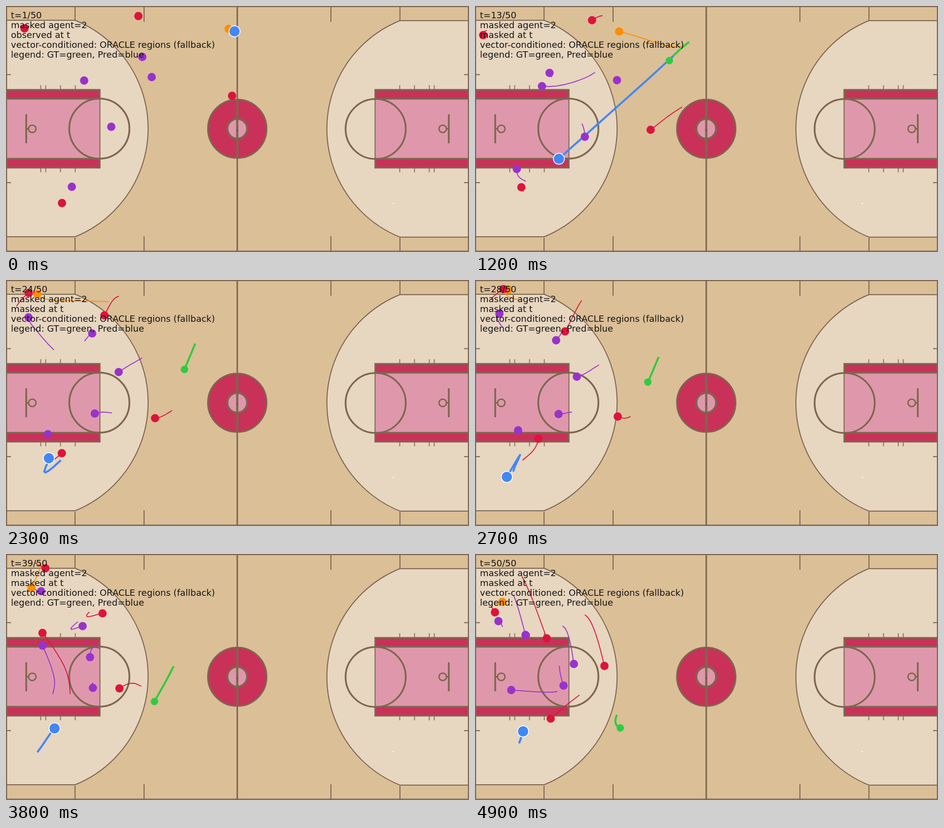
Write an HTML page with a canvas that moves like this. It is 939x500 px and loops after 5000 ms.

```html
<!DOCTYPE html>
<html lang="en">
<head>
<meta charset="utf-8">
<title>Masked agent trajectories</title>
<style>
html, body { margin: 0; width: 100%; height: 100%; overflow: hidden; background: #dbbf97; }
canvas { display: block; }
</style>
</head>
<body>
<canvas id="stage" width="939" height="500"></canvas>
<script>
const W = 939, H = 500, STEP = 100, STEPS = 50, TAIL = 8;
const RED = '#dc143c', PURPLE = '#9932cc', ORANGE = '#ff8c00', GREEN = '#2ecc40', BLUE = '#4287f5';
const FLOOR = '#dbbf97', LIGHT = '#e7d6c0', LINE = '#7d6650', CRIMSON = '#c93158', PINK = '#df98ab';

const ctx = document.getElementById('stage').getContext('2d');

// Steps at which a path passes its waypoints
const STOPS = [0, 6, 13, 19, 27, 33, 42, 49];
const PRED_STOPS = [0, 1, 3, 6, 11, 19, 22, 25, 33, 38, 42, 49];

// Smooth curve through the values v at the times ts
function spline(ts, v) {
  const last = ts.length - 1;
  const gap = i => ts[i + 1] - ts[i];
  const slope = i => (v[i + 1] - v[i]) / gap(i);
  const inner = i => (slope(i - 1) * gap(i) + slope(i) * gap(i - 1)) / (gap(i - 1) + gap(i));
  const tangent = i =>
    i === 0 ? 1.5 * slope(0) - .5 * inner(1) :
    i === last ? 1.5 * slope(last - 1) - .5 * inner(last - 1) : inner(i);
  return t => {
    let i = 0;
    while (i < last - 1 && t >= ts[i + 1]) i++;
    const d = gap(i), u = (t - ts[i]) / d, w = 1 - u;
    return v[i] * (1 + 2 * u) * w * w + v[i + 1] * u * u * (3 - 2 * u) +
      d * u * w * (tangent(i) * w - tangent(i + 1) * u);
  };
}

function track(color, points, { r = 8.4, width = 1.8, stops = STOPS } = {}) {
  return {
    color, r, width,
    x: spline(stops, points.map(p => p[0])),
    y: spline(stops, points.map(p => p[1]))
  };
}

const tracks = [
  track(ORANGE, [[451, 46], [411, 83], [267, 47], [93, 40], [67, 19], [70, 25], [39, 100], [55, 97]]),

  track(RED, [[268, 20], [253, 20], [234, 30], [216, 41], [182, 104], [163, 126], [229, 129], [262, 227]]),
  track(RED, [[37, 45], [19, 51], [17, 58], [32, 38], [57, 18], [62, 20], [100, 55], [145, 171]]),
  track(RED, [[458, 182], [402, 216], [349, 256], [315, 277], [289, 277], [257, 262], [205, 291], [153, 334]]),
  track(RED, [[113, 400], [93, 369], [94, 368], [96, 366], [128, 322], [123, 241], [37, 113], [40, 118]]),

  track(PURPLE, [[276, 103], [222, 146], [122, 159], [56, 96], [49, 68], [61, 73], [80, 89], [102, 164]]),
  track(PURPLE, [[158, 151], [154, 141], [152, 133], [174, 105], [164, 122], [131, 151], [182, 150], [200, 223]]),
  track(PURPLE, [[295, 144], [288, 147], [285, 152], [251, 172], [206, 196], [177, 189], [171, 232], [179, 267]]),
  track(PURPLE, [[213, 245], [217, 240], [221, 268], [196, 268], [169, 272], [175, 262], [160, 280], [73, 276]]),
  track(PURPLE, [[133, 367], [92, 350], [84, 328], [84, 314], [87, 305], [98, 256], [52, 140], [47, 136]]),

  track(GREEN, [[463, 51], [421, 83], [390, 116], [372, 156], [350, 207], [328, 250], [285, 333], [294, 353]],
    { r: 7.5, width: 4 }),
  track(BLUE, [[463, 51], [447, 72], [420, 86], [354, 145], [194, 288], [77, 389],
    [91, 355], [71, 388], [70, 393], [98, 354], [90, 381], [97, 360]],
    { r: 10.5, width: 4, stops: PRED_STOPS })
];

function line(width, ...p) {
  ctx.lineWidth = width;
  ctx.beginPath();
  ctx.moveTo(p[0], p[1]);
  for (let i = 2; i < p.length; i += 2) ctx.lineTo(p[i], p[i + 1]);
  ctx.stroke();
}

function disc(x, y, r, fill) {
  ctx.beginPath();
  ctx.arc(x, y, r, 0, 2 * Math.PI);
  ctx.fillStyle = fill;
  ctx.fill();
}

function ring(x, y, r, width) {
  ctx.lineWidth = width;
  ctx.beginPath();
  ctx.arc(x, y, r, 0, 2 * Math.PI);
  ctx.stroke();
}

function box(x, y, w, h, fill) {
  ctx.fillStyle = fill;
  ctx.fillRect(x, y, w, h);
}

// Left half; the right one is mirrored, with its arcs dy lower
function halfCourt(dy) {
  const top = 29 + dy, bottom = 469 + dy, mid = 249 + dy;
  const a = Math.atan2(220, 89.5);

  ctx.beginPath();
  ctx.moveTo(0, top);
  ctx.lineTo(140, top);
  ctx.arc(50.7, mid, 237.5, -a, a);
  ctx.lineTo(0, bottom);
  ctx.closePath();
  ctx.fillStyle = LIGHT;
  ctx.fill();
  ctx.lineWidth = 2;
  ctx.stroke();

  for (const [x, len] of [[140, 29], [280, 32]]) {
    line(2, x, 0, x, len);
    line(2, x, H - len, x, H);
  }
  for (const y of [139.5, 359]) line(2, 0, y, 10, y);

  box(0, 190, 190, 120, PINK);
  line(2, 190.5, 189, 190.5, 310);
  for (const y of [170.5, 310.5]) {
    box(0, y, 190, 18, CRIMSON);
    ctx.lineWidth = 3.5;
    ctx.strokeRect(1, y, 189, 18);
  }
  for (const x of [70.5, 80.5, 110.5, 140.5]) {
    line(1.6, x, 161, x, 170);
    line(1.6, x, 330, x, 338);
  }
  ring(189.3, mid + .3, 61, 3.5);
  line(3.5, 41, 220, 41, 279);
  line(3, 41, 249.5, 46, 249.5);
  ring(53.3, 249.7, 7.6, 2.8);
}

function court() {
  box(0, 0, W, H, FLOOR);
  ctx.strokeStyle = LINE;
  halfCourt(0);
  ctx.save();
  ctx.translate(W, 0);
  ctx.scale(-1, 1);
  halfCourt(.7);
  ctx.restore();

  disc(469, 249.5, 59.5, CRIMSON);
  ring(469, 249.5, 59.5, 3.2);
  disc(469, 249.5, 20, PINK);
  ring(469, 249.5, 20, 4);
  line(3, 469, 0, 469, H);
  line(4.5, 469, 190, 469, 309);
  disc(469, 252.5, 1.3, '#5b4637');
  ctx.lineWidth = 2.5;
  ctx.strokeRect(1, 1, W - 2, H - 2.5);
  disc(785.5, 401.5, 1.3, '#fff');
}

function drawTail(tr, step) {
  const pts = [];
  for (let i = Math.max(0, step - TAIL); i <= step; i++) pts.push(tr.x(i), tr.y(i));
  ctx.strokeStyle = tr.color;
  line(tr.width, ...pts);
}

function drawDot(tr, step) {
  const x = tr.x(step), y = tr.y(step);
  if (tr.color === BLUE) disc(x, y, 12, '#fff');
  disc(x, y, tr.r, tr.color);
}

function caption(step) {
  ctx.font = '18px "DejaVu Sans", sans-serif';
  ctx.fillStyle = '#141414';
  [
    `t=${step + 1}/${STEPS}`,
    'masked agent=2',
    step ? 'masked at t' : 'observed at t',
    'vector-conditioned: ORACLE regions (fallback)',
    'legend: GT=green, Pred=blue'
  ].forEach((s, i) => ctx.fillText(s, 10, 25 + 20 * i));
}

function draw(now) {
  const step = Math.floor(now / STEP) % STEPS;
  ctx.lineJoin = 'miter';
  court();
  ctx.save();
  ctx.translate(.5, .5);
  ctx.lineJoin = 'round';
  for (const tr of tracks) drawTail(tr, step);
  for (const tr of tracks) drawDot(tr, step);
  ctx.restore();
  caption(step);
}

const start = performance.now();
function tick() {
  draw(performance.now() - start);
  requestAnimationFrame(tick);
}
tick();
</script>
</body>
</html>
```
